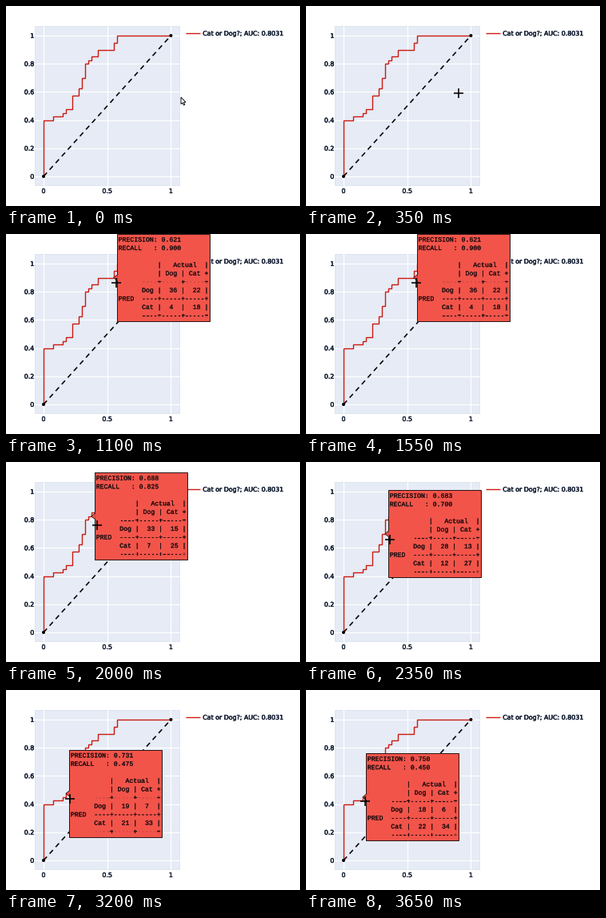
These frames come from a looping animation (368 px wide and 250 px high, 3700 ms). A matplotlib script:

```python
import numpy as np
import matplotlib.pyplot as plt
from matplotlib.animation import FuncAnimation
from matplotlib.patches import Circle, Polygon, Rectangle
from matplotlib.patheffects import withStroke

W, H, DPI = 368, 250, 100
FRAMES, STEP = 74, 50
PT = 72 / DPI  # points per pixel

INK, RED, BOX, EDGE = "#0f1a30", "#cc1a10", "#f2544a", "#2b1616"
LEFT, RIGHT, TOP, BOTTOM = 36, 217.4, 25, 224.4
N = 40  # samples per class

plt.rcParams["text.hinting"] = "none"
fig = plt.figure(figsize=(W / DPI, H / DPI), dpi=DPI, facecolor="white")
ax = fig.add_axes([0, 0, 1, 1])
ax.set_xlim(0, W)
ax.set_ylim(H, 0)
ax.axis("off")


def px(v):
    return 47 + 159.4 * v


def py(v):
    return 213 - 176 * v


def line(xs, ys, color, width, z, **kw):
    return ax.plot(xs, ys, color=color, lw=width * PT, zorder=z, **kw)[0]


def heavier(color, width):
    return [withStroke(linewidth=width * PT, foreground=color)]


def label(x, y, text, ha):
    ax.text(x, y + 2.9, text, family="DejaVu Sans", size=7.87 * PT,
            color=INK, ha=ha, va="baseline", zorder=4,
            path_effects=heavier(INK, 0.45))


# Plot area, grid and tick labels
ax.add_patch(Rectangle((LEFT, TOP), RIGHT - LEFT, BOTTOM - TOP,
                       fc="#e6ebf5", ec="#dbe5f1", lw=PT, zorder=0))
for v in (0, 0.5, 1):
    line([px(v)] * 2, [TOP, BOTTOM], "white", 1.2, 1)
    label(px(v), 231, f"{v:g}", "center")
for v in np.arange(6) / 5:
    line([LEFT, RIGHT], [py(v)] * 2, "white", 1.2, 1)
    label(35.3, py(v), f"{v:g}", "right")

# ROC staircase: false and true positive counts at each corner
ups = np.cumsum([16, 1, 1, 1, 4, 2, 3, 4, 1, 1, 2, 2, 2])
rights = np.cumsum([3, 3, 1, 2, 2, 1, 1, 1, 1, 2, 5, 1, 17])
corners = [(0, 0)]
for up, right in zip(ups, rights):
    corners += [(corners[-1][0], up), (right, up)]
corners = np.array(corners)
points = np.column_stack([px(corners[:, 0] / N), py(corners[:, 1] / N)])
line(points[:, 0], points[:, 1], RED, 1.4, 2, solid_joinstyle="miter")

# Chance diagonal
width = 1.6
line([px(0), px(1)], [py(0), py(1)], "black", width, 3,
     dashes=(6.2 / width, 5.1 / width), dash_capstyle="butt")
for v in (0, 1):
    ax.add_patch(Circle((px(v), py(v)), 2, fc="black", ec="none", zorder=3))

# Legend
line([225, 243], [34, 34], RED, 1.4, 4, solid_capstyle="butt")
label(246.3, 34, "Cat or Dog?; AUC: 0.8031", "left")

# Hover box
BOX_W, BOX_H, CHAR, ROW = 116.3, 109, 4.9, 10.55
TEXT = "#1d0d10"
frame_box = Rectangle((0, 0), BOX_W, BOX_H, fc=BOX, ec=EDGE, lw=PT, zorder=5)
caret = Polygon([(0, 0)] * 3, closed=False, fc=BOX, ec=EDGE,
                lw=0.8 * PT, zorder=5)
ax.add_patch(frame_box)
ax.add_patch(caret)
rows = [ax.text(0, 0, "", family="Liberation Mono", size=CHAR / 0.6 * PT,
                color=TEXT, va="baseline", zorder=6,
                path_effects=heavier(TEXT, 0.2)) for _ in range(10)]
hover = [frame_box, caret, *rows]

# Mouse cursors
cross = [line([0, 0], [0, 0], "black", 1.6, 8, solid_capstyle="butt")
         for _ in range(2)]
ARROW = np.array([(0, 0), (0, 8.6), (2, 6.9), (3.4, 10), (4.8, 9.4),
                  (3.5, 6.4), (6, 6.2)])
arrow = Polygon(ARROW, closed=True, fc="white", ec="black",
                lw=0.9 * PT, zorder=8)
ax.add_patch(arrow)

# Centre of the crosshair: time, x, y
PATH = np.array([
    (0, 224.5, 120), (100, 224.5, 120), (700, 145, 93), (800, 145, 93),
    (1080, 138, 61), (1650, 138, 61), (2000, 114, 79), (2250, 109, 80),
    (2350, 105, 97), (2800, 92, 125), (3200, 80, 136), (3650, 74, 139),
])
HOTSPOT = np.array([5.5, 6])
REACH = 12


def report(fp, tp):
    rule = "      ----+-----+-----+"
    return [
        f"PRECISION: {tp / max(tp + fp, 1):.3f}",
        f"RECALL   : {tp / N:.3f}",
        "",
        "          |   Actual  |",
        "          | Dog | Cat +",
        rule,
        f"      Dog |  {tp:<3}|  {fp:<3}|",
        "PRED" + rule[4:],
        f"      Cat |  {N - tp:<3}|  {N - fp:<3}|",
        rule,
    ]


def show_hover(i):
    x, y = points[i]
    left, top = x + 4, max(y - BOX_H / 2, 0)
    frame_box.set_xy((left, top))
    caret.set_xy([(left + 1, y - 4), (x, y), (left + 1, y + 4)])
    for k, (art, text) in enumerate(zip(rows, report(*corners[i]))):
        body = text.lstrip()
        indent = len(text) - len(body)
        art.set_text(body)
        art.set_position((left + 2 + indent * CHAR, top + 9.4 + k * ROW))


def update(n):
    t = n * STEP
    centre = np.array([np.interp(t, PATH[:, 0], PATH[:, k]) for k in (1, 2)])
    tip = centre - HOTSPOT
    inside = tip[0] < RIGHT

    x, y = centre
    cross[0].set_data([x - 6, x + 6], [y, y])
    cross[1].set_data([x, x], [y - 6, y + 6])
    for art in cross:
        art.set_visible(inside)
    arrow.set_xy(ARROW + tip)
    arrow.set_visible(not inside)

    dist = np.hypot(*(points - tip).T)
    nearest = dist.argmin()
    near = dist[nearest] < REACH
    if near:
        show_hover(nearest)
    for art in hover:
        art.set_visible(near)
    return [*hover, *cross, arrow]


anim = FuncAnimation(fig, update, frames=FRAMES, interval=STEP,
                     repeat=True, repeat_delay=0, blit=False)
plt.show()
```
